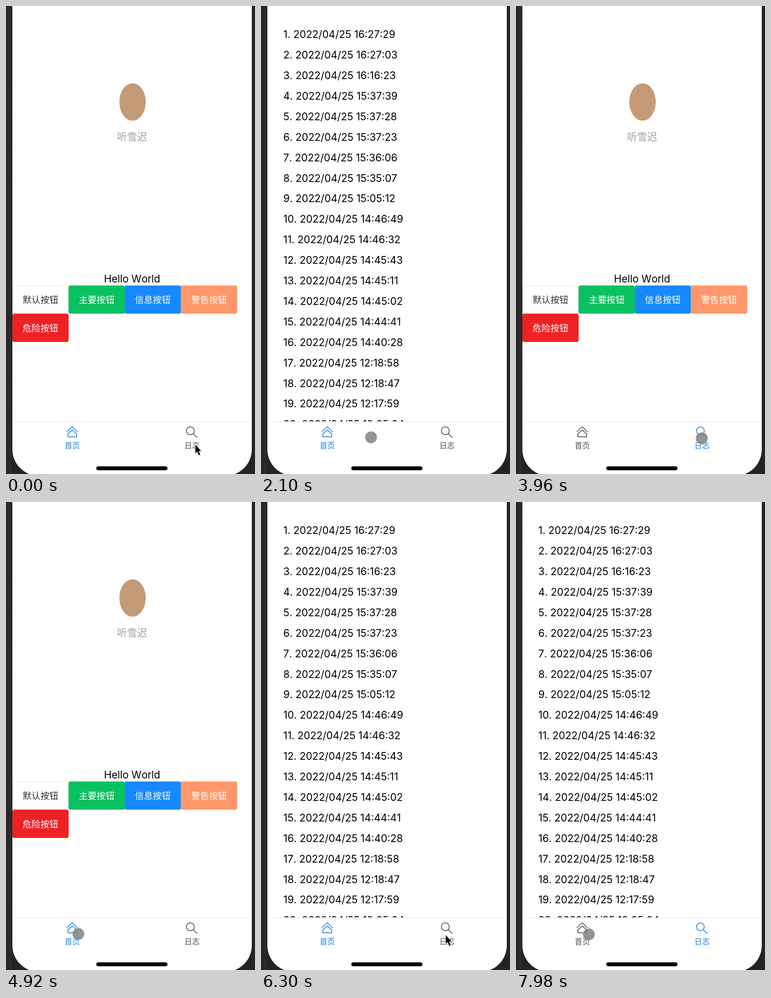
Animation of 547x1024 px, one loop 8000 ms. Source, as an HTML page with a canvas:

```html
<!DOCTYPE html>
<html lang="zh">
<head>
<meta charset="utf-8">
<title>Tab bar</title>
<style>
html, body { margin: 0; width: 100%; height: 100%; overflow: hidden; background: #282828; }
canvas { display: block; }
</style>
</head>
<body>
<canvas id="stage" width="547" height="1024"></canvas>
<script>
const ctx = document.getElementById('stage').getContext('2d');
const LOOP = 8000, STEP = 60, GLIDE = 180, LOAD = 300;
const LATIN = 'Inter, "Noto Sans", sans-serif';
const CJK = '"Noto Sans CJK SC", "Noto Sans CJK", sans-serif';
const ACTIVE = '#1f80dd', IDLE = '#4c4c4c';
const LEFT = 14, WIDTH = 526, MIDDLE = LEFT + WIDTH / 2, BAR_TOP = 909;
const HOME = 0, LOG = 1;

const times = ('16:27:29 16:27:03 16:16:23 15:37:39 15:37:28 15:37:23 15:36:06 ' +
  '15:35:07 15:05:12 14:46:49 14:46:32 14:45:43 14:45:11 14:45:02 14:44:41 ' +
  '14:40:28 12:18:58 12:18:47 12:17:59 12:05:24').split(' ');

const buttons = [
  ['默认按钮', '#ffffff'], ['主要按钮', '#0bc15f'], ['信息按钮', '#1789fc'],
  ['警告按钮', '#ff976a'], ['危险按钮', '#ee2225']
];

const clicks = [
  { at: 1620, tab: LOG }, { at: 2640, tab: HOME }, { at: 4740, tab: HOME },
  { at: 5940, tab: LOG }, { at: 7440, tab: LOG }
];

const moves = [
  { at: -GLIDE, x: 416, y: 960 }, { at: 1992, x: 147, y: 935 },
  { at: 2460, x: 147, y: 943 }, { at: 3180, x: 408, y: 946 },
  { at: 4200, x: 152, y: 943 }, { at: 4800 - GLIDE / 3, x: 159, y: 945 },
  { at: 5280, x: 406, y: 948 }, { at: 6600, x: 400, y: 945 },
  { at: 7080, x: 402, y: 939 }, { at: 7800, x: 160, y: 946 }
];

const ease = p => p * p * (3 - 2 * p);

// Every page owns its tab bar, so a click marks only the bar of the page on show.
function appAt(t) {
  const bars = [HOME, HOME];
  let page = HOME;
  for (const { at, tab } of clicks) {
    if (t >= at) bars[page] = tab;
    if (t >= at + LOAD) page = tab;
  }
  return { page, active: bars[page] };
}

// The pointer turns into an arrow on a click and back into a dot when it moves.
function pointerAt(t) {
  const i = moves.findLastIndex(m => m.at <= t);
  const to = moves[i], from = moves[i - 1] || to;
  const e = ease(Math.min(1, (t - to.at) / GLIDE));
  const clicked = clicks.some(c => c.at > to.at && c.at <= t);
  return {
    x: from.x + (to.x - from.x) * e,
    y: from.y + (to.y - from.y) * e,
    arrow: i === 0 || clicked
  };
}

function text(str, x, y, size, color, family = CJK, align = 'center') {
  ctx.font = `${size}px ${family}`;
  ctx.fontKerning = 'none';
  ctx.fillStyle = color;
  ctx.textAlign = align;
  ctx.fillText(str, x, y);
}

function box(x, y, w, h, r, fill, stroke) {
  ctx.beginPath();
  ctx.roundRect(x, y, w, h, r);
  ctx.fillStyle = fill;
  ctx.fill();
  if (stroke) {
    ctx.strokeStyle = stroke;
    ctx.lineWidth = 1;
    ctx.stroke();
  }
}

function drawPhone() {
  const bezel = ctx.createLinearGradient(0, 0, LEFT, 0);
  bezel.addColorStop(0, '#232323');
  bezel.addColorStop(0.7, '#2d2d2d');
  bezel.addColorStop(1, '#242424');
  ctx.fillStyle = bezel;
  ctx.fillRect(0, 0, 547, 1024);
  box(LEFT, -100, WIDTH, 1128, 58, '#ffffff');
}

function drawHome() {
  ctx.fillStyle = '#c49a76';
  ctx.beginPath();
  ctx.ellipse(MIDDLE + 1, 210, 29, 41, 0, 0, Math.PI * 2);
  ctx.fill();
  text('听雪迟', MIDDLE, 293.5, 22, '#a0a0a0');
  text('Hello World', MIDDLE, 605, 22.4, '#000000', LATIN);
  const w = 123.4, h = 61.7;
  buttons.forEach(([label, fill], i) => {
    const x = LEFT + i % 4 * w, y = 611.5 + Math.floor(i / 4) * h;
    const plain = i === 0;
    box(x + 0.5, y + 0.5, w - 0.8, h - 0.9, 3, fill, plain ? '#e3e4e6' : fill);
    text(label, x + w / 2, y + 38.3, 19.6, plain ? '#323233' : '#ffffff');
  });
}

function drawLog() {
  ctx.save();
  ctx.beginPath();
  ctx.rect(LEFT, 0, WIDTH, BAR_TOP);
  ctx.clip();
  times.forEach((time, i) =>
    text(`${i + 1}. 2022/04/25 ${time}`, 49, 70.2 + i * 44.9, 22.5, '#000000', LATIN, 'left'));
  ctx.restore();
}

function drawHouse(x, y) {
  ctx.stroke(new Path2D(`M${x - 11.5} ${y}l11.5 -11l11.5 11
    M${x - 9.7} ${y + 4.7}l9.7 -8.6l9.7 8.6v6.4h-19.4z`));
}

function drawLens(x, y) {
  ctx.beginPath();
  ctx.arc(x, y, 8.6, 0, Math.PI * 2);
  ctx.moveTo(x + 6.3, y + 6.3);
  ctx.lineTo(x + 15, y + 14.5);
  ctx.stroke();
}

function drawBar(active) {
  ctx.fillStyle = '#e8e8e8';
  ctx.fillRect(LEFT, BAR_TOP, WIDTH, 1);
  [['首页', drawHouse, 0], ['日志', drawLens, -3.5]].forEach(([label, icon, shift], i) => {
    const x = LEFT + WIDTH * (i + 0.5) / 2, color = i === active ? ACTIVE : IDLE;
    ctx.strokeStyle = color;
    ctx.lineWidth = 1.7;
    ctx.lineJoin = ctx.lineCap = 'round';
    icon(x + shift, i ? 929.5 : 931.5);
    text(label, x + 0.2, 968, 16.6, color);
  });
  box(198.5, 1007.5, 156, 8, 4, '#000000', '#383838');
}

function drawDot(x, y) {
  ctx.beginPath();
  ctx.arc(x, y, 13, 0, Math.PI * 2);
  ctx.fillStyle = 'rgba(128,128,128,0.84)';
  ctx.fill();
  ctx.strokeStyle = 'rgba(190,190,190,0.8)';
  ctx.lineWidth = 1;
  ctx.stroke();
}

function drawArrow(x, y) {
  const shape = new Path2D('M0 0V18.5L4.2 14.8L7.4 22.8L10.6 21.4L7.4 13.8L12.6 13.4Z');
  ctx.save();
  ctx.translate(x, y);
  ctx.strokeStyle = '#ffffff';
  ctx.lineWidth = 2.6;
  ctx.lineJoin = 'round';
  ctx.shadowColor = 'rgba(0,0,0,0.3)';
  ctx.shadowBlur = 2;
  ctx.shadowOffsetY = 1;
  ctx.stroke(shape);
  ctx.shadowColor = 'transparent';
  ctx.fillStyle = '#000000';
  ctx.fill(shape);
  ctx.restore();
}

function draw() {
  const t = Math.floor(performance.now() % LOOP / STEP) * STEP;
  const { page, active } = appAt(t);
  const { x, y, arrow } = pointerAt(t);
  drawPhone();
  page === HOME ? drawHome() : drawLog();
  drawBar(active);
  arrow ? drawArrow(x, y) : drawDot(x, y);
  requestAnimationFrame(draw);
}
draw();
</script>
</body>
</html>
```
